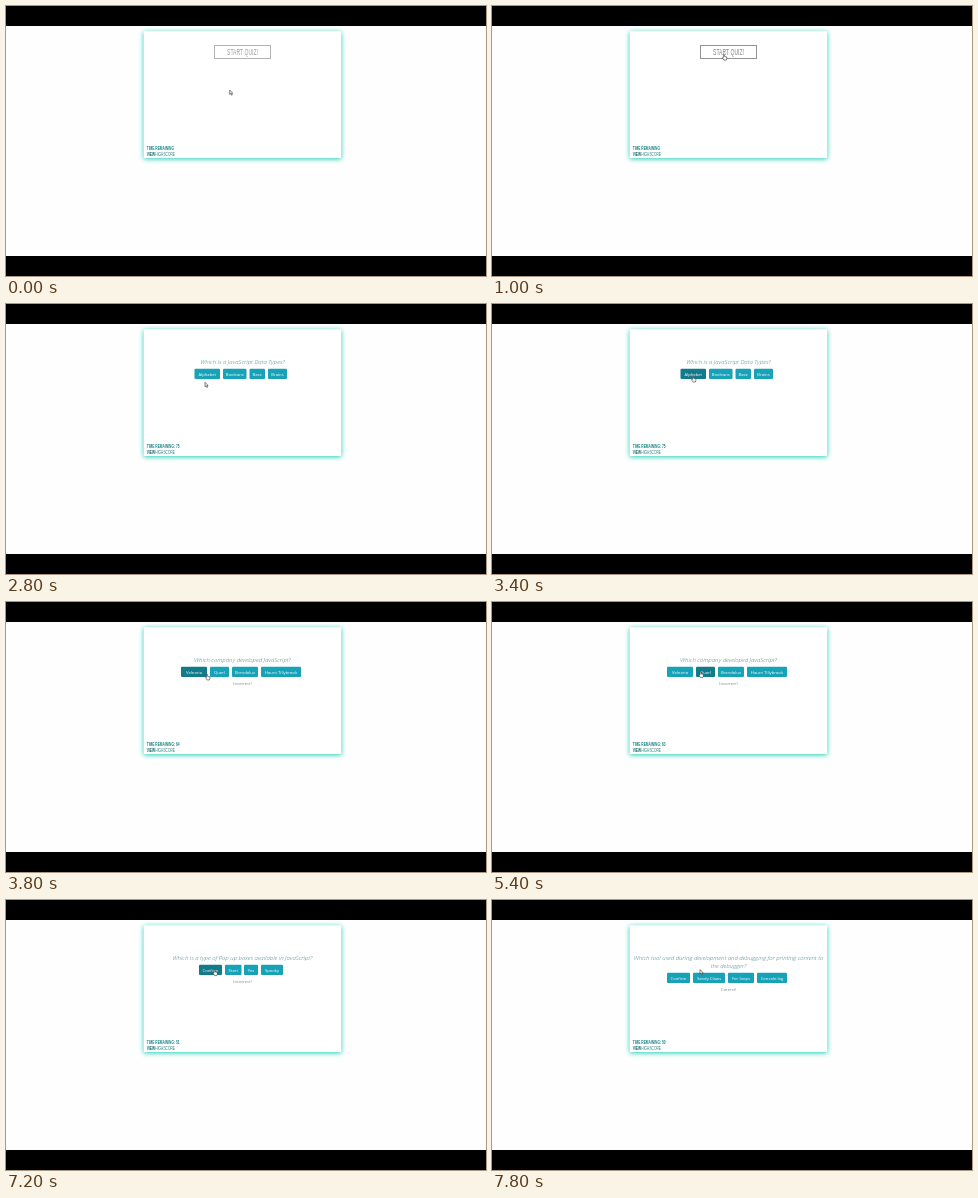
An HTML page with a canvas that plays this animation: 480 by 270 pixels, repeating every 8000 ms.

```html
<!DOCTYPE html>
<html lang="en">
<head>
<meta charset="utf-8">
<title>JavaScript quiz</title>
<style>
  html, body { margin: 0; width: 100%; height: 100%; overflow: hidden; background: #fefefe; }
  canvas { display: block; }
</style>
</head>
<body>
<canvas id="stage" width="480" height="270"></canvas>
<script>
const ctx = document.getElementById('stage').getContext('2d');
const LOOP = 8000, STEP = 200, CENTER = 236.5;
const SANS = '"Open Sans", sans-serif';
const CONDENSED = 0.56;

// Each answer is [label, left, right].
const questions = [
  { from: 1800, lines: ['Which is a JavaScript Data Types?'],
    answers: [['Alphabet', 188.5, 214], ['Booleans', 217, 240.5], ['Base', 243.5, 259], ['Brains', 262, 281]] },
  { from: 3600, lines: ['Which company developed JavaScript?'], feedback: 'Incorrect!',
    answers: [['Velnoria', 175, 201], ['Quorl', 204, 223], ['Brendolux', 226, 252], ['Haunt Tillybrook', 255, 295]] },
  { from: 6000, lines: ['Which is a type of Pop up boxes available in JavaScript?'], feedback: 'Incorrect!',
    answers: [['Confirm', 193, 216], ['Start', 219, 235.5], ['Yes', 238, 252], ['Spooky', 255, 277]] },
  { from: 7600, feedback: 'Correct!',
    lines: ['Which tool used during development and debugging for printing content to', 'the debugger?'],
    answers: [['Confirm', 175, 198], ['Sandy Claws', 201, 233], ['For loops', 236, 262], ['Console.log', 265, 295]] }
];

// [time, value]
const countdown = [[0, ''], [2800, ': 75'], [3800, ': 64'], [4800, ': 63'], [5800, ': 62'], [6600, ': 51'], [7600, ': 50']];
// [time, x, y]
const cursorPath = [[0, 223.7, 84], [1200, 232, 45.3], [1800, 232, 45.3], [2800, 199, 78.3],
  [3400, 200.5, 72], [4400, 200.5, 72], [5400, 208, 69.6], [LOOP, 208, 69.6]];

function text(str, x, y, font, color, align = 'center') {
  ctx.font = font;
  ctx.fillStyle = color;
  ctx.textAlign = align;
  ctx.fillText(str, x, y);
}

function condensed(str, x, y, font, color, align) {
  ctx.save();
  ctx.translate(x, y);
  ctx.scale(CONDENSED, 1);
  text(str, 0, 0, font + ' "Liberation Sans", sans-serif', color, align);
  ctx.restore();
}

function cursorAt(t) {
  const i = cursorPath.findIndex(p => p[0] > t);
  const [t0, x0, y0] = cursorPath[i - 1], [t1, x1, y1] = cursorPath[i];
  const k = (t - t0) / (t1 - t0), e = k * k * (3 - 2 * k);
  return { x: x0 + (x1 - x0) * e, y: y0 + (y1 - y0) * e };
}

const inside = (p, left, top, right, bottom) => p.x >= left && p.x <= right && p.y >= top && p.y <= bottom;

function drawPage() {
  ctx.fillStyle = '#fefefe';
  ctx.fillRect(0, 0, 480, 270);
  ctx.fillStyle = '#000';
  ctx.fillRect(0, 0, 480, 20);
  ctx.fillRect(0, 250, 480, 20);
  ctx.save();
  ctx.shadowColor = '#19cdb4';
  ctx.shadowBlur = 5;
  ctx.shadowOffsetY = 1;
  ctx.fillStyle = '#fff';
  ctx.beginPath();
  ctx.roundRect(137.7, 25.3, 197.5, 126.7, 1);
  ctx.fill();
  ctx.restore();
}

function drawStart(cursor) {
  const over = inside(cursor, 208, 39, 265, 53);
  ctx.strokeStyle = over ? '#929292' : '#b4b4b4';
  ctx.lineWidth = 1;
  ctx.strokeRect(208.5, 39.5, 56, 13);
  condensed('START QUIZ!', CENTER, 48.9, '9px', over ? '#858585' : '#a0a0a0');
  return over;
}

function drawQuestion({ lines, answers, feedback }, cursor) {
  const top = 56.8 + 8 * lines.length;
  let hovering = false;
  lines.forEach((line, i) => text(line, CENTER, 59.5 + 8 * i, 'italic 300 6px ' + SANS, '#3f8588'));
  for (const [label, left, right] of answers) {
    const over = inside(cursor, left, top, right, top + 10.2);
    hovering ||= over;
    ctx.fillStyle = over ? '#117a8b' : '#17a2b8';
    ctx.beginPath();
    ctx.roundRect(left, top, right - left, 10.2, 1);
    ctx.fill();
    text(label, (left + right) / 2, top + 6.7, '4.2px ' + SANS, '#fff');
  }
  if (feedback) text(feedback, CENTER, top + 18, '4.2px ' + SANS, '#858585');
  return hovering;
}

function drawCursor({ x, y }, hand) {
  ctx.save();
  ctx.translate(x, y);
  ctx.fillStyle = '#fff';
  ctx.strokeStyle = '#333';
  ctx.lineWidth = 0.6;
  ctx.stroke(ctx.fill(hand ? handShape : arrowShape) || (hand ? handShape : arrowShape));
  ctx.restore();
}
const arrowShape = new Path2D('M0 0V4.4L1 3.5L1.8 5.2L2.6 4.8L1.8 3.2H3.1Z');
const handShape = new Path2D('M0 0.3Q.5-.3 1 .3V2.2L3.4 2.8V4.4L2.9 6H.6L-1 3.6Q-.8 2.9 0 3.4Z');

function draw(t) {
  const cursor = cursorAt(t);
  const question = questions.findLast(q => q.from <= t);
  drawPage();
  const hovering = question ? drawQuestion(question, cursor) : drawStart(cursor);
  const left = countdown.findLast(c => c[0] <= t)[1];
  condensed('TIME REMAINING' + left, 140.7, 143.9, 'bold 5.8px', '#1b8587', 'left');
  condensed('VIEW', 140.7, 149.6, 'bold 5.8px', '#146b6e', 'left');
  condensed('HIGHSCORE', 169, 149.6, '5.8px', '#257f81', 'right');
  drawCursor(cursor, hovering);
}

function frame() {
  draw(Math.floor(performance.now() % LOOP / STEP) * STEP);
  requestAnimationFrame(frame);
}
frame();
</script>
</body>
</html>
```
